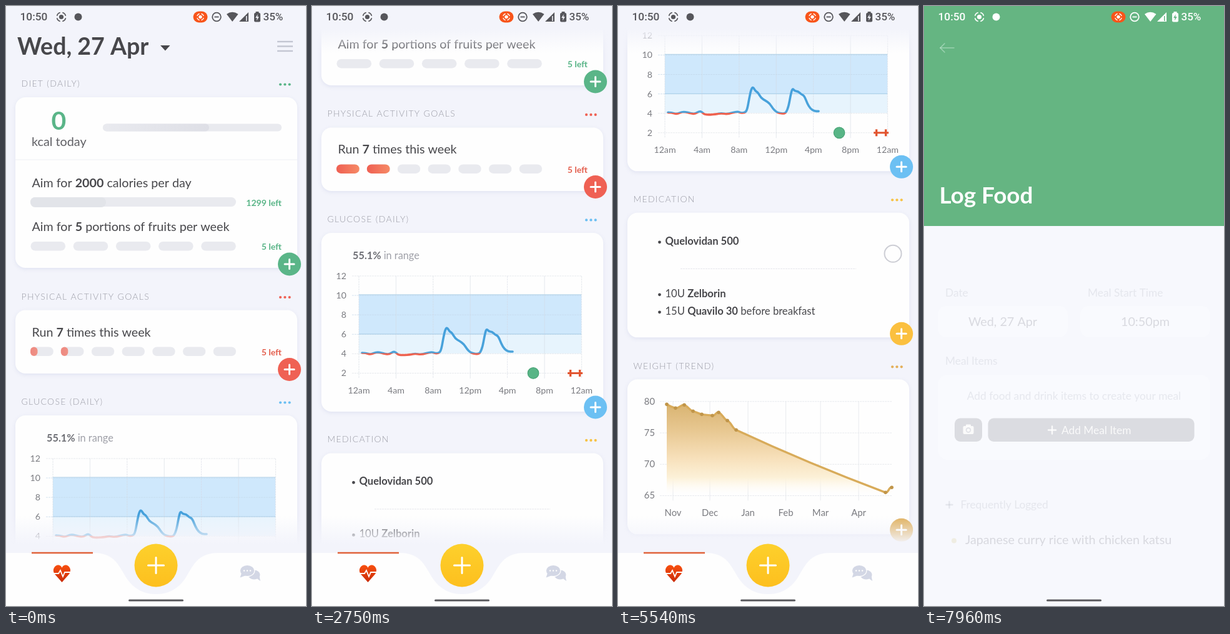
Recreate the animation shown at these times as an HTML page with a canvas. Size 480 by 960 pixels, loop 8 s.

```html
<!DOCTYPE html>
<html lang="en">
<head>
<meta charset="utf-8">
<title>Health diary</title>
<style>
html, body { margin: 0; width: 100%; height: 100%; overflow: hidden; background: #f3f4fb; }
canvas { display: block; width: 480px; height: 960px; }
</style>
</head>
<body>
<canvas id="stage" width="480" height="960"></canvas>
<script>
const c = document.getElementById('stage').getContext('2d');
const LOOP = 8000, BG = '#f3f4fb', BG_CLEAR = 'rgba(243,244,251,0)', CARD = '#fefefe', EMPTY = '#e9eaef';
const INK = '#47474b', AXIS = '#7a7b80', GRID = '#e8eaee', GREEN = '#5ab588', RED = '#ef6154';

const clamp = v => Math.max(0, Math.min(1, v));
const lerp = (a, b, p) => a + (b - a) * p;
const easeOut = p => 1 - (1 - p) ** 3;

// Smooth monotone curve through [time, value] keys.
function track(keys) {
  const slope = keys.slice(1).map((k, i) => (k[1] - keys[i][1]) / (k[0] - keys[i][0]));
  const tan = keys.map((_, i) => {
    const a = slope[i - 1], b = slope[i];
    return a * b > 0 ? 2 * a * b / (a + b) : 0;
  });
  return t => {
    if (t <= keys[0][0]) return keys[0][1];
    const i = keys.findIndex(k => k[0] > t) - 1;
    if (i < 0) return keys[keys.length - 1][1];
    const h = keys[i + 1][0] - keys[i][0], p = (t - keys[i][0]) / h, q = 1 - p;
    return keys[i][1] * (1 + 2 * p) * q * q + keys[i + 1][1] * p * p * (3 - 2 * p)
      + h * (tan[i] * p * q * q - tan[i + 1] * p * p * q);
  };
}

const scrollAt = track([[1800, 0], [2000, 90], [2200, 190], [2400, 250], [2750, 292], [2920, 295],
  [3290, 295], [3450, 380], [3700, 510], [4000, 592], [4200, 606], [4330, 618], [4500, 680],
  [4800, 735], [5000, 745], [5240, 745], [5540, 677], [5800, 518], [6080, 263], [6300, 90], [6500, 0]]);

const touches = [
  { from: 1780, to: 2080, x: 425, y: 560 },
  { from: 3270, to: 3500, x: 423, y: 540 },
  { from: 4180, to: 4500, x: 423, y: 465 },
  { from: 5200, to: 5800, x: 448, endX: 404, y: 328 },
  { from: 7290, to: 7400, x: 453, y: 413 }
];

function text(s, x, y, size, color, { w = 400, align = 'left', ls = 0, font = 'Lato' } = {}) {
  c.font = `${w} ${size}px ${font}, sans-serif`;
  c.textAlign = align;
  c.letterSpacing = ls + 'px';
  c.fillStyle = color;
  c.fillText(s, x, y);
  return c.measureText(s).width;
}

// Parts between asterisks are bold.
function rich(s, x, y, size, color = INK) {
  s.split('*').forEach((part, i) => { x += text(part, x, y, size, color, { w: i % 2 ? 700 : 400 }); });
}

function box(x, y, w, h, r, fill) {
  c.beginPath();
  c.roundRect(x, y, w, h, r);
  c.fillStyle = fill;
  c.fill();
}

function disc(x, y, r, fill) {
  c.beginPath();
  c.arc(x, y, r, 0, 7);
  c.fillStyle = fill;
  c.fill();
}

function ring(x, y, r, color, width) {
  c.beginPath();
  c.arc(x, y, r, 0, 7);
  c.strokeStyle = color;
  c.lineWidth = width;
  c.stroke();
}

function line(pts, color, width = 1, dash = []) {
  c.beginPath();
  pts.forEach(p => c.lineTo(p[0], p[1]));
  c.strokeStyle = color;
  c.lineWidth = width;
  c.setLineDash(dash);
  c.stroke();
  c.setLineDash([]);
}

function shape(d, fill) {
  c.fillStyle = fill;
  c.fill(new Path2D(d));
}

function grad(x0, y0, x1, y1, ...stops) {
  const g = c.createLinearGradient(x0, y0, x1, y1);
  stops.forEach((s, i) => Array.isArray(s) ? g.addColorStop(s[0], s[1]) : g.addColorStop(i / (stops.length - 1), s));
  return g;
}

function plus(x, y, r, width, color = '#fff') {
  c.lineCap = 'round';
  line([[x - r, y], [x + r, y]], color, width);
  line([[x, y - r], [x, y + r]], color, width);
  c.lineCap = 'butt';
}

function fab(y, color) {
  disc(453.5, y, 18.5, color);
  plus(453.5, y, 7.5, 3);
}

function section(title, y, color, top, bottom) {
  text(title, 24.5, y + 5, 14, '#9b9ca6', { w: 300, ls: 1.3 });
  for (let i = 0; i < 3; i++) disc(439 + i * 7.3, y + 1.5, 2.1, color);
  c.shadowColor = 'rgba(180,186,220,.3)';
  c.shadowBlur = 6;
  c.shadowOffsetY = 2;
  box(15, top, 451, bottom - top, 16, CARD);
  c.shadowColor = 'transparent';
}

function pills(n, y, pitch, w) {
  for (let i = 0; i < n; i++) box(39.5 + i * pitch, y, w, 14.5, 7.2, EMPTY);
}

function left(s, y, color) {
  text(s, 441, y, 14, color, { w: 700, align: 'right' });
}

function header() {
  text('Wed, 27 Apr', 18, 77.5, 37.5, INK, { w: 700 });
  shape('M247 63H262.5L254.8 71.5Z', INK);
  for (const y of [57, 64.5, 72]) line([[434, y], [459, y]], '#c3c6d2', 2.4);
}

function diet(p) {
  section('DIET (DAILY)', 124, GREEN, 146, 419);
  text(Math.round(701 * p), 84.5, 198, 41, GREEN, { w: 700, align: 'center' });
  text('kcal today', 41, 224, 19.8, '#5f5f64');
  box(155, 188.5, 286, 12, 6, EMPTY);
  box(155, 188.5, 170, 12, 6, grad(155, 0, 325, 0, EMPTY, '#dedfe6'));
  c.save();
  c.globalAlpha = p;
  c.beginPath();
  c.roundRect(155, 188.5, 286, 12, 6);
  c.clip();
  box(155, 188, 136, 13, 0, grad(155, 0, 291, 0, '#cfa5f3', '#b486d8'));
  box(291, 188, 89, 13, 0, grad(291, 0, 380, 0, '#8b96d6', '#8380f2'));
  box(380, 188, 61, 13, 0, grad(380, 0, 441, 0, '#93b2fb', '#6e9ae0'));
  c.restore();
  c.globalAlpha = p;
  const cap = { ls: 1.1, w: 300 };
  text('CARBS', 160, 181, 12, '#83848c', cap);
  text('PROTEIN', 335.5, 181, 12, '#83848c', { ...cap, align: 'center' });
  text('FAT', 425, 181, 12, '#83848c', { ...cap, align: 'center' });
  text('70g', 160, 220, 14.5, AXIS);
  text('46g', 335, 220, 14.5, AXIS, { align: 'center' });
  text('14g', 425, 220, 14.5, AXIS, { align: 'center' });
  c.globalAlpha = 1;
  line([[15, 246], [466, 246]], '#f0f1f5', 1.2);

  rich('Aim for *2000* calories per day', 41.5, 289.5, 19.7);
  box(39, 306, 329, 15, 7.5, EMPTY);
  box(39, 306, 121, 16, 7.5, '#e2e4e9');
  if (p > 0.02) box(39, 306, 120 * p, 15, Math.min(7.5, 60 * p), grad(39, 0, 159, 0, '#57b384', '#84d0b0'));
  left('1299 left', 319.5, GREEN);
  rich('Aim for *5* portions of fruits per week', 41.5, 360, 19.7);
  pills(5, 377, 68.2, 55.5);
  left('5 left', 390, GREEN);
  fab(413, GREEN);
}

function activity(p) {
  section('PHYSICAL ACTIVITY GOALS', 464.5, RED, 486.5, 588);
  rich('Run *7* times this week', 41.5, 528.5, 19.7);
  pills(7, 545.5, 48.7, 36.3);
  c.globalAlpha = lerp(0.7, 1, p);
  for (const x of [39, 87.8]) {
    box(x, 545.5, lerp(11.5, 36.8, p), 14.5, 7.2, grad(x, 0, x + 37, 0, '#ef5f52', '#f68a66'));
  }
  c.globalAlpha = 1;
  left('5 left', 559, '#e4604f');
  fab(581.5, RED);
}

function glucose() {
  section('GLUCOSE (DAILY)', 633, '#6cbff2', 655, 941);
  const n = text('55.1%', 65, 697, 16.3, '#6f7076', { w: 700 });
  text(' in range', 65 + n, 697, 16.3, '#9fa0a8');
  box(75, 754, 356, 63, 0, '#cfe8fc');
  box(75, 817, 356, 31, 0, '#e7f4fd');
  for (let i = 0; i < 6; i++) {
    const y = 724 + i * 31.1;
    text(12 - i * 2, 55, y + 5, 14.2, AXIS, { align: 'right' });
    line([[64, y], [431, y]], i > 0 && i < 4 ? 'rgba(195,215,232,.7)' : GRID, 1, [3, 1]);
  }
  for (let i = 0; i < 7; i++) {
    const x = 75 + i * 59.4;
    line([[x, 724], [x, 888]], 'rgba(212,217,226,.6)', 1, i % 2 ? [] : [3, 1]);
    text(['12am', '4am', '8am', '12pm', '4pm', '8pm', '12am'][i], x, 912, 14.2, AXIS, { align: 'center' });
  }
  line([[75, 754], [431, 754]], '#b9d6ea', 1.2);
  line([[75, 817], [431, 817]], '#b0d2ea', 1.2);

  const pts = [[80, 555], [86, 555], [94, 558], [104, 553], [118, 557], [124, 557], [130, 553], [134, 554],
    [139, 559], [157, 558], [165, 556], [175, 558], [191, 553], [197, 556], [204, 555], [207, 549], [210, 532],
    [213, 518], [216, 514], [220, 521], [224, 523], [229, 532], [236, 536], [243, 541], [248, 549], [253, 554],
    [258, 556], [265, 557], [269, 555], [273, 545], [276, 528], [279, 516], [283, 521], [288, 521], [293, 526],
    [298, 528], [303, 541], [308, 549], [314, 553], [321, 553]];
  c.beginPath();
  c.moveTo(pts[0][0], pts[0][1] + 292);
  pts.slice(1).forEach(([x, y], i) => {
    const next = pts[i + 2] || [x, y];
    c.quadraticCurveTo(x, y + 292, (x + next[0]) / 2, (y + next[1]) / 2 + 292);
  });
  c.strokeStyle = grad(0, 800, 0, 860, [0, '#439fdc'], [0.785, '#4ba3da'], [0.8, '#ee6350'], [1, '#ee6350']);
  c.lineWidth = 3.6;
  c.lineCap = c.lineJoin = 'round';
  c.stroke();
  c.lineCap = 'butt';

  disc(354, 879.5, 9, '#58b586');
  ring(354, 879.5, 8.8, '#4ba477', 1.2);
  line([[409, 879.5], [433, 879.5]], '#e2542f', 3);
  for (const x of [413.5, 428.5]) line([[x, 874], [x, 885]], '#e2542f', 3.4);
  fab(934, '#6cc0f3');
}

function medication() {
  section('MEDICATION', 985.5, '#f7c244', 1007.5, 1207);
  ['*Quelovidan 500*', '10U *Zelborin*', '15U *Quavilo 30* before breakfast'].forEach((s, i) => {
    const y = [1053, 1137, 1165][i];
    disc(66.5, y + 1.5, 2.4, INK);
    rich(s, 75.5, y + 5.5, 16.6);
  });
  line([[100, 1097], [381, 1097]], '#e5e6eb', 1, [3, 1]);
  fab(1201, '#fbc03f');
}

function weight() {
  section('WEIGHT (TREND)', 1252.5, '#e3ae58', 1274, 1522);
  const months = [[88, 'Nov'], [147, 'Dec'], [208, 'Jan'], [268.5, 'Feb'], [324, 'Mar'], [385, 'Apr']];
  for (let i = 0; i < 4; i++) {
    const y = 1309.5 + i * 50.2;
    text(80 - i * 5, 59, y + 5, 14.8, AXIS, { align: 'right' });
    line([[67, y], [439, y]], GRID, 1, [3, 1]);
  }
  for (const [x, name] of months) {
    line([[x, 1309], [x, 1468]], GRID, 1);
    text(name, x, 1493, 14.8, AXIS, { align: 'center' });
  }
  const pts = [[78, 637], [92, 643], [106, 638], [120, 648], [134, 653], [151, 655], [161, 650], [175, 663],
    [189, 678], [428, 778], [438, 770]].map(([x, y]) => [x, y + 677]);
  const curve = () => {
    c.beginPath();
    c.moveTo(...pts[0]);
    for (let i = 1; i < pts.length; i++) {
      const [x, y] = pts[i], [px, py] = pts[i - 1];
      if (x === 428) c.quadraticCurveTo(305, 1409, x, y);
      else c.bezierCurveTo(px + 5, py + (i > 1 ? 1 : 3), x - 5, y - 1, x, y);
    }
  };
  curve();
  c.lineTo(438, 1457);
  c.lineTo(78, 1457);
  c.fillStyle = grad(0, 1314, 0, 1457, [0, '#d9b472'], [0.3, '#e8c892'], [0.6, '#f7e0ba'],
    [0.82, '#fcf1d8'], [1, 'rgba(255,250,240,0)']);
  c.fill();
  curve();
  c.strokeStyle = '#d8ab5a';
  c.lineWidth = 3.4;
  c.stroke();
  pts.forEach(([x, y]) => disc(x, y, 2.8, '#c0954a'));
  fab(1515, '#dfae58');
}

function tabBar() {
  shape('M0 875H140C175 875 181 897 194 917C206 934 222 941 240 941C258 941 274 934 286 917C299 897 305 875 340 875H480V960H0Z', CARD);
  line([[41, 875], [139, 875]], '#e0623a', 2.6);
  disc(240, 895, 34.5, grad(0, 861, 0, 930, '#fdd02c', '#fdbf1e'));
  plus(240, 895, 12.5, 3);
  shape('M89.5 922L78 909C73 902 78 894.5 83.5 894.5C87 894.5 89 897 89.5 899C90 897 92 894.5 95.5 894.5C101 894.5 106 902 101 909Z',
    grad(0, 894, 0, 922, '#f9500f', '#c92b08'));
  line([[76, 908], [84, 908], [87, 903], [91, 913], [94, 906], [103, 906]], CARD, 1.8);
  const chat = '#d3d7e5';
  c.fillStyle = chat;
  c.beginPath();
  c.ellipse(397, 910, 9.5, 7.5, 0, 0, 7);
  c.fill();
  shape('M400 915L407 920L405 910Z', chat);
  c.beginPath();
  c.ellipse(386, 903.5, 11.8, 9.2, 0, 0, 7);
  c.fill();
  c.strokeStyle = CARD;
  c.lineWidth = 1.2;
  c.stroke();
  shape('M377 907L374.5 914.5L384 911Z', chat);
  for (const x of [381, 386, 391]) disc(x, 903.5, 1.2, CARD);
}

function recordIcon(x, y, k, color) {
  disc(x, y, 3.6 * k, color);
  for (let i = 0; i < 4; i++) {
    c.beginPath();
    c.arc(x, y, 7.2 * k, i * Math.PI / 2 + 0.25, (i + 1) * Math.PI / 2 - 0.25);
    c.strokeStyle = color;
    c.lineWidth = 1.7 * k;
    c.stroke();
  }
}

function statusBar(color, hole) {
  const style = { w: 500, font: 'Roboto' };
  text('10:50', 22.5, 23, 17.3, color, style);
  recordIcon(88.5, 17.5, 1, color);
  disc(115.5, 17.5, 6, color);
  box(299.5, 8.5, 23, 18, 9, '#f8541a');
  recordIcon(311, 17.5, 0.75, '#fff');
  ring(337, 17.5, 6.8, color, 1.8);
  line([[333.5, 17.5], [340.5, 17.5]], color, 1.8);
  shape('M353 13Q362 6.5 371.5 13L362.2 25Z', color);
  shape('M388 10V25H373Z', color);
  box(384, 16, 1.5, 8, 0, hole);
  box(397, 11, 10, 14.5, 2, color);
  box(399.5, 9, 5, 3, 0.5, color);
  shape('M402.8 13L399.2 19H401.6L401 23.5L404.8 17.2H402.2Z', hole);
  text('35%', 411.5, 23, 17, color, style);
}

function home(t) {
  const s = scrollAt(t), p = easeOut(clamp((t - 40) / 1000));
  box(0, 0, 480, 960, 0, BG);
  c.save();
  c.translate(0, -s);
  header();
  diet(p);
  activity(p);
  glucose();
  medication();
  weight();
  c.restore();
  c.globalAlpha = clamp(s / 60);
  box(0, 0, 480, 76, 0, grad(0, 36, 0, 76, BG, BG_CLEAR));
  c.globalAlpha = 1;
  box(0, 815, 480, 145, 0, grad(0, 815, 0, 861, BG_CLEAR, BG));
  tabBar();
}

function logFood(t) {
  const hint = '#b4b5c4', value = '#80818c', button = '#86868f', top = '#65b582';
  box(0, 0, 480, 960, 0, '#f7f8fd');
  box(0, 0, 480, 352, 0, top);
  text('Log Food', 24.5, 316, 36.8, '#fff', { w: 700 });
  c.globalAlpha = clamp((t - 7700) / 520);
  c.lineCap = 'round';
  line([[48, 67], [26, 67]], '#d2f0e0', 1.6);
  line([[33, 60], [26, 67], [33, 74]], '#d2f0e0', 1.6);
  c.lineCap = 'butt';
  c.globalAlpha = clamp((t - 7700) / 1000);
  box(22, 480, 208, 50, 14, CARD);
  box(250, 480, 208, 50, 14, CARD);
  box(22, 590, 436, 136, 16, CARD);
  text('Date', 34, 465, 17.3, hint);
  text('Meal Start Time', 262, 465, 17.3, hint);
  text('Wed, 27 Apr', 126, 512, 19.8, value, { align: 'center' });
  text('10:50pm', 354, 512, 19.8, value, { align: 'center' });
  text('Meal Items', 34, 574, 17.3, hint);
  text('Add food and drink items to create your meal', 240, 630, 17.3, hint, { align: 'center' });
  box(49, 659.5, 44, 37.5, 9, button);
  box(102.5, 659.5, 330, 37.5, 9, button);
  plus(40.5, 798, 5, 2.4, hint);
  text('Frequently Logged', 58.5, 804, 17.3, hint);
  disc(48, 855.5, 4, '#d9cf9a');
  text('Japanese curry rice with chicken katsu', 66, 861, 19.7, value);
  c.globalAlpha = clamp((t - 7700) / 300);
  box(62.5, 672, 17, 13, 2, CARD);
  box(67, 669.5, 8, 4, 1, CARD);
  ring(71, 678.5, 3.4, '#dadbe2', 1.6);
  plus(205, 678.5, 6, 2.4, CARD);
  text('Add Meal Item', 220, 684.5, 17.3, CARD);
  c.globalAlpha = 1;
}

function drawTouch(t) {
  for (const { from, to, x, endX = x, y } of touches) {
    if (t < from || t > to + 400) continue;
    const at = Math.min(t, to), p = (at - from) / (to - from);
    const px = lerp(x, endX, p ** 3), py = y - scrollAt(at) + scrollAt(from);
    c.globalAlpha = clamp((t - from) / 80) * clamp(1 - (t - to) / 400);
    disc(px, py, 13.5, 'rgba(255,255,255,.45)');
    ring(px, py, 13.5, '#cccdd4', 2);
    c.globalAlpha = 1;
  }
}

const layer = document.createElement('canvas');
layer.width = 480;
layer.height = 960;

function draw(t) {
  const fade = clamp((t - 7440) / 220);
  home(t);
  if (fade > 0) {
    // Cross-dissolve from a copy of the home screen to the new page.
    const l = layer.getContext('2d');
    l.clearRect(0, 0, 480, 960);
    l.drawImage(c.canvas, 0, 0);
    logFood(t);
    c.globalAlpha = 1 - fade;
    c.drawImage(layer, 0, 0);
    c.globalAlpha = 1;
  }
  const dark = fade > 0.5;
  statusBar(dark ? '#fff' : '#56565b', dark ? '#65b582' : BG);
  box(196, 949.5, 88, 3, 1.5, '#58585c');
  drawTouch(t);
}

const start = performance.now();
function tick() {
  draw((performance.now() - start) % LOOP);
  requestAnimationFrame(tick);
}
tick();
</script>
</body>
</html>
```
